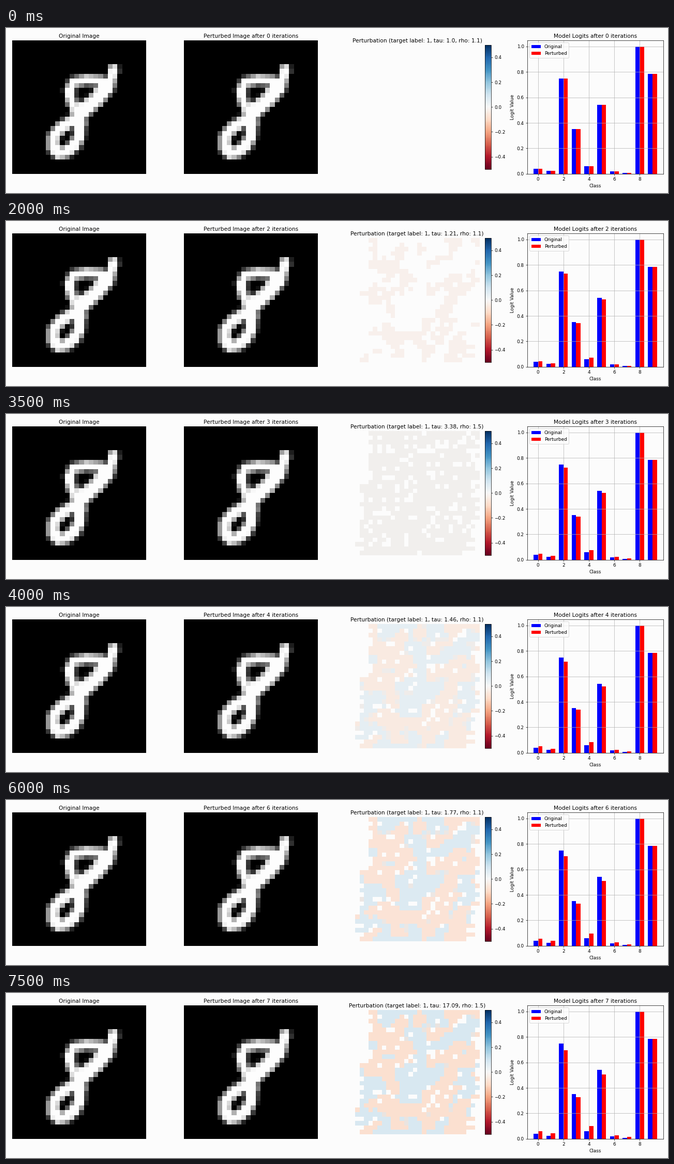
Animation of 1280x320 px, one loop 8 s. Source, as a matplotlib script:

```python
import numpy as np
import matplotlib.pyplot as plt
from matplotlib.animation import FuncAnimation
from matplotlib.cm import ScalarMappable
from matplotlib.colors import Normalize, to_rgb

W, H, DPI = 1280, 320, 64
N, STEPS = 28, 8
PAPER = "#fcfcfc"
RDBU = plt.get_cmap("RdBu")
ROWS, COLS = np.mgrid[0:N, 0:N].astype(float)

plt.rcParams.update({"font.family": "DejaVu Sans", "font.size": 10})


def stroke(half_width, *pts):
    """Soft brush line through (column, row) points."""
    ink = np.zeros((N, N))
    for (x0, y0), (x1, y1) in zip(pts, pts[1:]):
        dx, dy = x1 - x0, y1 - y0
        t = np.clip(((COLS - x0) * dx + (ROWS - y0) * dy) / (dx**2 + dy**2), 0, 1)
        dist = np.hypot(COLS - x0 - t * dx, ROWS - y0 - t * dy)
        ink = np.maximum(ink, np.clip(half_width + 0.5 - dist, 0, 1))
    return ink


def draw_digit():
    return 0.99 * np.max([
        stroke(1.05, (20.7, 5.6), (20.1, 8)),
        stroke(1.6, (19.4, 9), (17, 12), (14.3, 14.2)),
        stroke(1.05, (13, 14.5), (12, 12.5), (11.4, 10.3), (12.3, 8.3),
               (15, 7.75), (18.3, 8)),
        stroke(1.4, (13.5, 14.5), (13.6, 17)),
        stroke(1.2, (13.6, 17), (13.5, 19.5), (12.7, 21.3), (11, 22.8),
               (9.2, 23.2), (8.1, 22), (8.1, 19.8), (9.5, 18), (11.5, 16.7),
               (13.3, 15.2)),
    ], axis=0)


def noise_field():
    """Patchy signed noise (negative is red) and the mask of untouched cells."""
    rng = np.random.default_rng(8)
    field = rng.normal(size=(N, N))
    for _ in range(2):
        field = sum(np.roll(field, s, (0, 1))
                    for s in [(0, 0), (0, 1), (0, -1), (1, 0), (-1, 0), (1, -1)])
    field = (field - field.mean()) / field.std() - 0.15
    jitter = rng.uniform(-1, 1, (N, 1))
    left = np.where(ROWS < 12, 3, 0.8) + jitter
    right = 27.3 - 0.15 * np.clip(ROWS - 14, 0, None) + jitter
    blank = (COLS < left) | (COLS > right) | (rng.random((N, N)) < 0.08)
    return field, blank


FIELD, BLANK = noise_field()


def perturbation(step, fast):
    """Red and blue patches that deepen and spread with every step."""
    paper = np.array(to_rgb(PAPER))
    img = np.tile(paper, (N, N, 1))
    if step < 2:
        return img
    red, blue = (np.array(RDBU(0.5 + s * 0.0115 * step)[:3]) for s in (-1, 1))
    grey = (red + blue) / 2
    if step == 2:
        blue = paper
    elif step == 3:
        red = blue = grey
    limit = (1 / step - 0.1) * (0.85 if fast else 1)
    img[:] = grey if step > 3 else paper
    img[FIELD < -limit] = red
    img[FIELD > limit] = blue
    img[BLANK] = paper
    return img


START = np.array([.040, .022, .750, .350, .060, .540, .018, .007, .998, .784])
DRIFT = np.array([3, 3, -8, -3, 6, -5, 1.5, 1, 0, 0.3]) / 1000

fig = plt.figure(figsize=(W / DPI, H / DPI), dpi=DPI, facecolor=PAPER)


def panel(x, y, w, h):
    return fig.add_axes([x / W, 1 - (y + h) / H, w / W, h / H], facecolor=PAPER)


def show(ax, img, **kw):
    ax.axis("off")
    return ax.imshow(img, aspect="auto", interpolation="nearest", **kw)


ax_orig = panel(11.6, 24, 258.9, 258.9)
ax_pert = panel(344.4, 24, 258.9, 258.9)
ax_diff = panel(674.6, 32.9, 240.8, 240.8)
ax_bar = panel(1008, 24, 262.6, 258.9)

digit = draw_digit()
for ax in (ax_orig, ax_pert):
    show(ax, digit, cmap="gray", vmin=0, vmax=1)
ax_orig.set_title("Original Image")
diff = show(ax_diff, perturbation(0, False))
fig.colorbar(ScalarMappable(Normalize(-0.5, 0.5), RDBU),
             cax=panel(925.8, 32.9, 12.1, 240.8))

classes = np.arange(10)
ax_bar.bar(classes - 0.175, START, 0.35, color="blue", label="Original")
bars = ax_bar.bar(classes + 0.175, START, 0.35, color="red", label="Perturbed")
ax_bar.set(xlabel="Class", ylabel="Logit Value",
           xlim=(-0.835, 9.835), ylim=(0, 1.048))
ax_bar.grid(True)
ax_bar.legend(loc="upper left", facecolor=PAPER)


def update(i):
    step, fast = divmod(i, 2)
    rho = 1.5 if fast else 1.1
    ax_pert.set_title(f"Perturbed Image after {step} iterations")
    ax_diff.set_title(f"Perturbation (target label: 1, "
                      f"tau: {round(rho ** step, 2)}, rho: {rho})")
    ax_bar.set_title(f"Model Logits after {step} iterations")
    diff.set_data(perturbation(step, fast))
    for bar, height in zip(bars, START + DRIFT * step):
        bar.set_height(height)
    return ()


anim = FuncAnimation(fig, update, frames=2 * STEPS, init_func=lambda: update(0),
                     interval=500, repeat=True, repeat_delay=0, blit=False)
plt.show()
```
